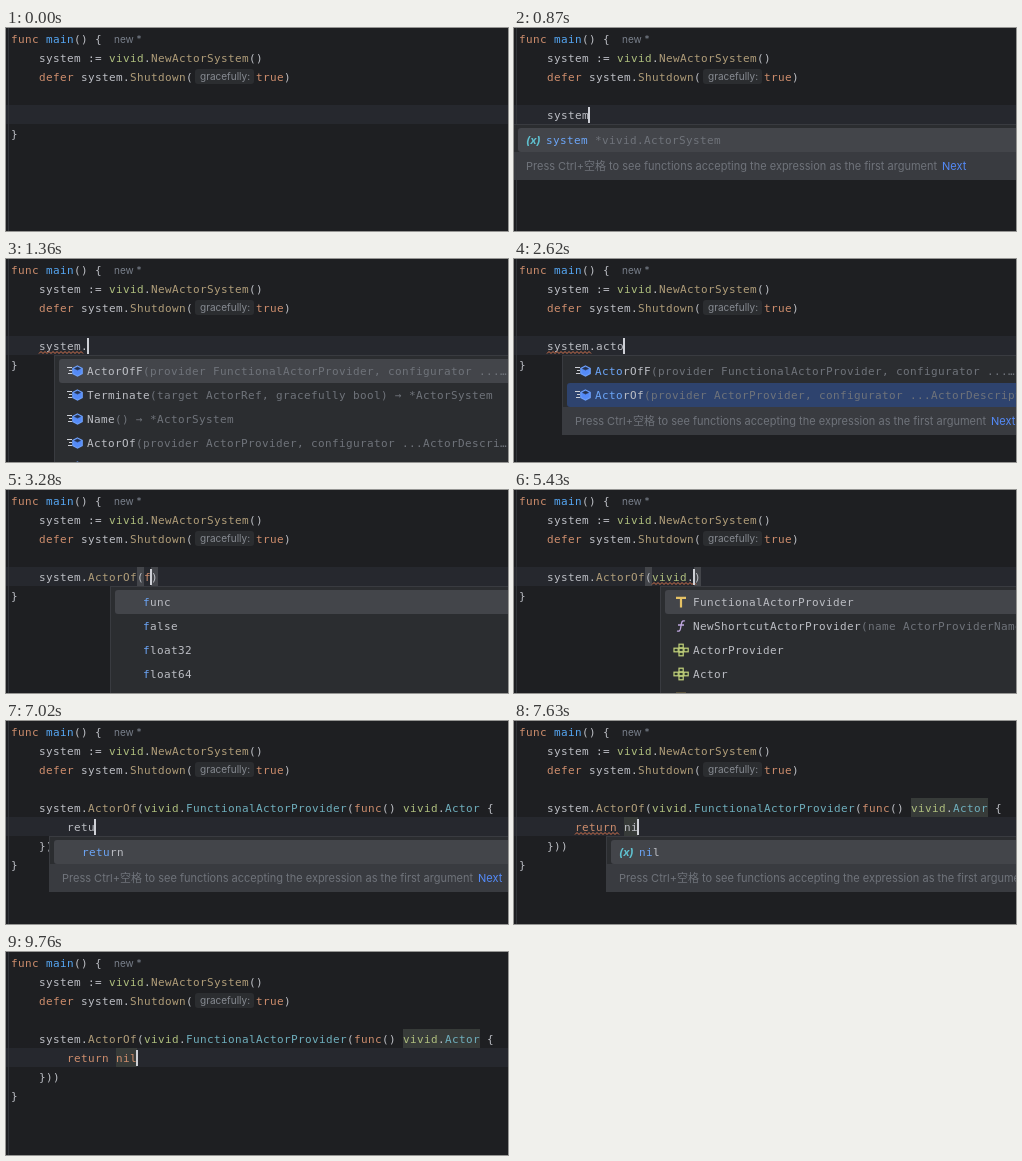
Recreate the animation shown at these times as an HTML page. Size 502 by 203 pixels, loop 9980 ms.

```html
<!DOCTYPE html>
<html lang="en">
<head>
<meta charset="utf-8">
<style>
  html, body { margin: 0; width: 100%; height: 100%; overflow: hidden; background: #1e1f22; }
  svg { display: block; }
  text { white-space: pre; }
  .code { font: 11px "DejaVu Sans Mono", monospace; letter-spacing: .378px; }
  .ui { font: 11px Inter, "Noto Sans CJK SC", "Noto Sans CJK", sans-serif; }
  .inlay { font: 10px Inter, sans-serif; }
  .value { font: italic bold 11px Inter, sans-serif; }
</style>
</head>
<body>
<svg id="stage" width="502" height="203" viewBox="0 0 502 203"></svg>
<script>
const LOOP = 9980, CHAR = 7, LEFT = 5, LINE = 19;
const stage = document.getElementById('stage');

const colX = col => LEFT + col * CHAR;
const rowTop = row => 1 + (row - 1) * LINE;
const esc = s => s.replace(/&/g, '&amp;').replace(/</g, '&lt;');
const rect = (x, y, w, h, fill, extra = '') =>
  `<rect x="${x}" y="${y}" width="${w}" height="${h}" fill="${fill}" ${extra}/>`;
const text = (x, y, s, fill, cls = 'code') =>
  `<text x="${x}" y="${y}" fill="${fill}" class="${cls}">${esc(s)}</text>`;
const path = (d, stroke, w = 1, fill = 'none') =>
  `<path d="${d}" stroke="${stroke}" stroke-width="${w}" fill="${fill}"/>`;

// Syntax colours
const PLAIN = '#bcbec4', DIM = '#6f737a';
const palette = [
  [/^(func|defer|return|true|nil|f)$/, '#cf8e6d'],
  [/^main$/, '#56a8f5'],
  [/^vivid$/, '#afbf7e'],
  [/^(NewActorSystem|Shutdown|ActorOf)$/, '#b09d79'],
  [/^(FunctionalActorProvider|Actor)$/, '#6fafbd'],
];
const colorOf = word => (palette.find(([re]) => re.test(word)) || [0, PLAIN])[1];

function codeLine(row, src, x0 = LEFT) {
  let out = '';
  for (const m of src.matchAll(/\w+|[^\w\s]+/g))
    out += text(x0 + m.index * CHAR, rowTop(row) + 14, m[0], colorOf(m[0]));
  return out;
}

// Completion icons, centred on (x, y)
const icons = {
  method: (x, y) =>
    path(`M${x - 8} ${y - 3.5}h5M${x - 6} ${y - .5}h3M${x - 7} ${y + 2.5}h4`, '#ced0d6') +
    path(`M${x + 2.5} ${y - 5}l4.7 2.4v5.2l-4.7 2.4l-4.7 -2.4v-5.2z`, '#6c9ef8', 1.2, '#548af7') +
    path(`M${x - .5} ${y - 2.4}l3 -1.5l3 1.5l-3 1.5z`, '#25324d', .6, '#25324d'),
  value: (x, y) => text(x - 8, y + 4, '(x)', '#5fc0cf', 'value'),
  type: (x, y) => path(`M${x - 5} ${y - 4.2}h10M${x} ${y - 4}v9.5`, '#e5c265', 2.2),
  func: (x, y) => path(`M${x + 4} ${y - 5}q-3 -1 -3.5 2.5l-1 5q-.5 3.5 -3.5 2.5M${x - 3} ${y - 1}h6`, '#c0a8e0', 1.3),
  iface: (x, y) =>
    [[-5, 0], [0, 0], [5, 0], [0, -4], [0, 4]].map(([dx, dy]) =>
      rect(x + dx - 2, y + dy - 1.8, 4.2, 3.6, '#2f3a2c', 'stroke="#c3d37c" stroke-width="1.2"')).join(''),
  none: () => '',
};

// Lookup rows: icon, name, detail
const actorOfF = ['method', 'ActorOfF', '(provider FunctionalActorProvider, configurator ...…'];
const actorOf = tail => ['method', 'ActorOf', '(provider ActorProvider, configurator ...ActorDescri' + tail];
const members = [
  actorOfF,
  ['method', 'Terminate', '(target ActorRef, gracefully bool) → *ActorSystem'],
  ['method', 'Name', '() → *ActorSystem'],
  actorOf('…'),
  ['method', 'Shutdown', '(gracefully bool)'],
];
const actors = [actorOfF, actorOf('ptorConfigurator)')];
const exported = [
  ['type', 'FunctionalActorProvider', ''],
  ['func', 'NewShortcutActorProvider', '(name ActorProviderName, provider ActorProvider)'],
  ['iface', 'ActorProvider', ''],
  ['iface', 'Actor', ''],
  ['type', 'ActorName', ''],
];
const words = list => list.split(' ').map(w => ['none', w, '']);
const forF = words('func false float32 float64 fmt');
const forR = words('return recover range rune');

const pop = (x, rows, match = 0, sel = 0, strong = false) => ({ x, rows, match, sel, strong });

function drawPopup({ x, rows, match, sel, strong }, top) {
  const end = top + 4 + rows.length * 24;
  let out = rect(x + .5, top + .5, 900, end - top + 27, '#2b2d30', 'stroke="#393b40"');
  out += rect(x + 1, end, 900, 27, '#393b40');
  rows.forEach(([icon, name, detail], i) => {
    const y = top + 4 + i * 24, tx = x + 33;
    if (i === sel) out += rect(x + 5, y, 900, 24, strong ? '#2e436e' : '#43454a', 'rx="3"');
    out += icons[icon](x + 21, y + 12);
    out += text(tx, y + 16, name.slice(0, match), '#6ca5f7');
    out += text(tx + match * CHAR, y + 16, name.slice(match), PLAIN);
    out += text(tx + name.length * CHAR, y + 16, detail, DIM);
  });
  out += text(x + 13, end + 18, 'Press Ctrl+空格 to see functions accepting the expression as the first argument', DIM, 'ui');
  return out + text(x + 429, end + 18, 'Next', '#548af7', 'ui');
}

function wave(row, col, len) {
  let d = `M${colX(col)} ${rowTop(row) + 17.5}`;
  for (let i = 0; i < Math.round(len * CHAR / 4); i++) d += 'l2 -2l2 2';
  return path(d, '#d5744f');
}

function openParen(line, close) {
  let depth = 0;
  for (let i = close; i >= 0; i--) {
    if (line[i] === ')') depth++;
    if (line[i] === '(' && --depth === 0) return i;
  }
}

// Timeline: start, text with | as the caret, decorations
const S = '    system', A = S + '.ActorOf(', P = A + 'vivid.FunctionalActorProvider';
const F = P + '(func() vivid.Actor {\n', R = F + '        ';
const sysWave = [5, 4, 6], retWave = [6, 8, 6];
const sysHi = [[2, 4, 6], [3, 10, 6], [5, 4, 6]];
const vividHi = [[2, 14, 5], [5, 19, 5]];
const exitHi = n => [[5, 56, 11], [6, 15, n]];
const sysPop = n => pop(-1, [['value', 'system', ' *vivid.ActorSystem']], n);
const nilPop = n => pop(92, [['value', 'nil', '']], n);
const done = R + 'return nil|';

const steps = [
  [0, '    |', { off: true }],
  [130, '    |'],
  [460, '    s|'],
  [530, '    sy|'],
  [600, '    sys|', { pop: sysPop(3) }],
  [670, '    syst|', { pop: sysPop(4) }],
  [740, '    syste|', { pop: sysPop(5) }],
  [810, S + '|', { pop: sysPop(6) }],
  [940, S + '|', { hi: sysHi }],
  [1220, S + '.|'],
  [1290, S + '.|', { wave: sysWave }],
  [1360, S + '.|', { wave: sysWave, pop: pop(48, members) }],
  [1560, S + '.a|', { wave: sysWave, pop: pop(48, members) }],
  [1630, S + '.a|', { wave: sysWave, pop: pop(48, actors, 1) }],
  [1760, S + '.ac|', { wave: sysWave, pop: pop(48, actors, 2) }],
  [1960, S + '.act|', { wave: sysWave, pop: pop(48, actors, 3) }],
  [2150, S + '.acto|', { wave: sysWave, pop: pop(48, actors, 3) }],
  [2220, S + '.acto|', { wave: sysWave, pop: pop(48, actors, 4) }],
  [2620, S + '.acto|', { wave: sysWave, pop: pop(48, actors, 4, 1, true) }],
  [2750, S + '.ActorOf|', { wave: sysWave }],
  [2820, A + '|)', { wave: sysWave }],
  [2950, A + '|)'],
  [3150, A + 'f|)'],
  [3220, A + 'f|)', { pop: pop(104, forF, 1) }],
  [3430, A + 'f|)'],
  [3960, A + 'f|)', { off: true, tip: 'provider vivid.ActorProvider' }],
  [4030, A + 'f|)'],
  [4560, A + '|)'],
  [4830, A + 'v|)'],
  [5030, A + 'vi|)', { pop: pop(104, [['none', 'vivid', '']], 2) }],
  [5230, A + 'vivid|)', { hi: vividHi }],
  [5300, A + 'vivid.|)'],
  [5430, A + 'vivid.|)', { wave: [5, 19, 6], pop: pop(146, exported) }],
  [6090, P + '|)'],
  [6160, P + '(|))'],
  [6360, F + '    |'],
  [6490, R + '|'],
  [6750, R + 'r|'],
  [6820, R + 're|', { pop: pop(43, forR.slice(0, 3), 1) }],
  [6890, R + 'ret|', { pop: pop(43, forR.slice(0, 1), 3) }],
  [6960, R + 'retu|', { pop: pop(43, forR.slice(0, 1), 4) }],
  [7030, R + 'retur|', { pop: pop(43, forR.slice(0, 1), 5) }],
  [7100, R + 'return|', { pop: pop(43, forR.slice(0, 1), 6) }],
  [7230, R + 'return |', { hi: exitHi(0) }],
  [7300, R + 'return |', { hi: exitHi(0), wave: retWave }],
  [7430, R + 'return n|', { hi: exitHi(1), wave: retWave }],
  [7500, R + 'return n|', { hi: exitHi(1), wave: retWave, pop: nilPop(1) }],
  [7630, R + 'return ni|', { hi: exitHi(2), wave: retWave, pop: nilPop(2) }],
  [7700, done, { hi: exitHi(3), wave: retWave, pop: nilPop(3) }],
  [7770, done, { hi: exitHi(3) }],
  [8300, done, { hi: exitHi(3), off: true }],
  [8760, done, { hi: exitHi(3) }],
  [9310, done, { hi: exitHi(3), off: true }],
  [9760, done, { hi: exitHi(3) }],
];

function draw([, src, opts = {}]) {
  const typed = src.split('\n'), row = 4 + typed.length;
  const caret = typed[typed.length - 1].indexOf('|');
  const lines = typed.map(l => l.replace('|', ''));
  const current = lines[lines.length - 1], top = rowTop(row);
  const tail = lines.length > 1 ? ['    }))', '}'] : ['}'];

  let out = rect(0, 0, 502, 203, '#1e1f22') + rect(0, top, 502, LINE, '#26282e');
  out += rect(2, 0, 1, 203, '#313438');
  for (const [r, c, n] of opts.hi || []) out += rect(colX(c), rowTop(r), n * CHAR, LINE, '#373b39');
  if (current[caret] === ')')
    for (const c of [openParen(current, caret), caret]) out += rect(colX(c), top, CHAR, LINE, '#43454a');

  out += codeLine(1, 'func main() {') + text(108, 15, 'new *', '#787f8a', 'inlay');
  out += codeLine(2, '    system := vivid.NewActorSystem()');
  out += codeLine(3, '    defer system.Shutdown(');
  out += rect(189, 41, 59, 15, '#2b2d30', 'rx="3"') + text(194, 52, 'gracefully:', '#868a91', 'inlay');
  out += codeLine(3, 'true)', 250);
  [...lines, ...tail].forEach((l, i) => { out += codeLine(5 + i, l); });

  if (opts.wave) out += wave(...opts.wave);
  if (!opts.off) out += rect(colX(caret) - 1, top + 2, 2, 16, '#ced0d6');
  if (opts.pop) out += drawPopup(opts.pop, top + LINE);
  if (opts.tip) out += rect(11.5, 55.5, 194, 21, '#393b40', 'stroke="#43454a"') + text(20, 70, opts.tip, PLAIN, 'ui');
  stage.innerHTML = out;
}

let shown = -1;
function tick() {
  const t = performance.now() % LOOP;
  const i = steps.findLastIndex(s => s[0] <= t);
  if (i !== shown) draw(steps[shown = i]);
  requestAnimationFrame(tick);
}
tick();
</script>
</body>
</html>
```
